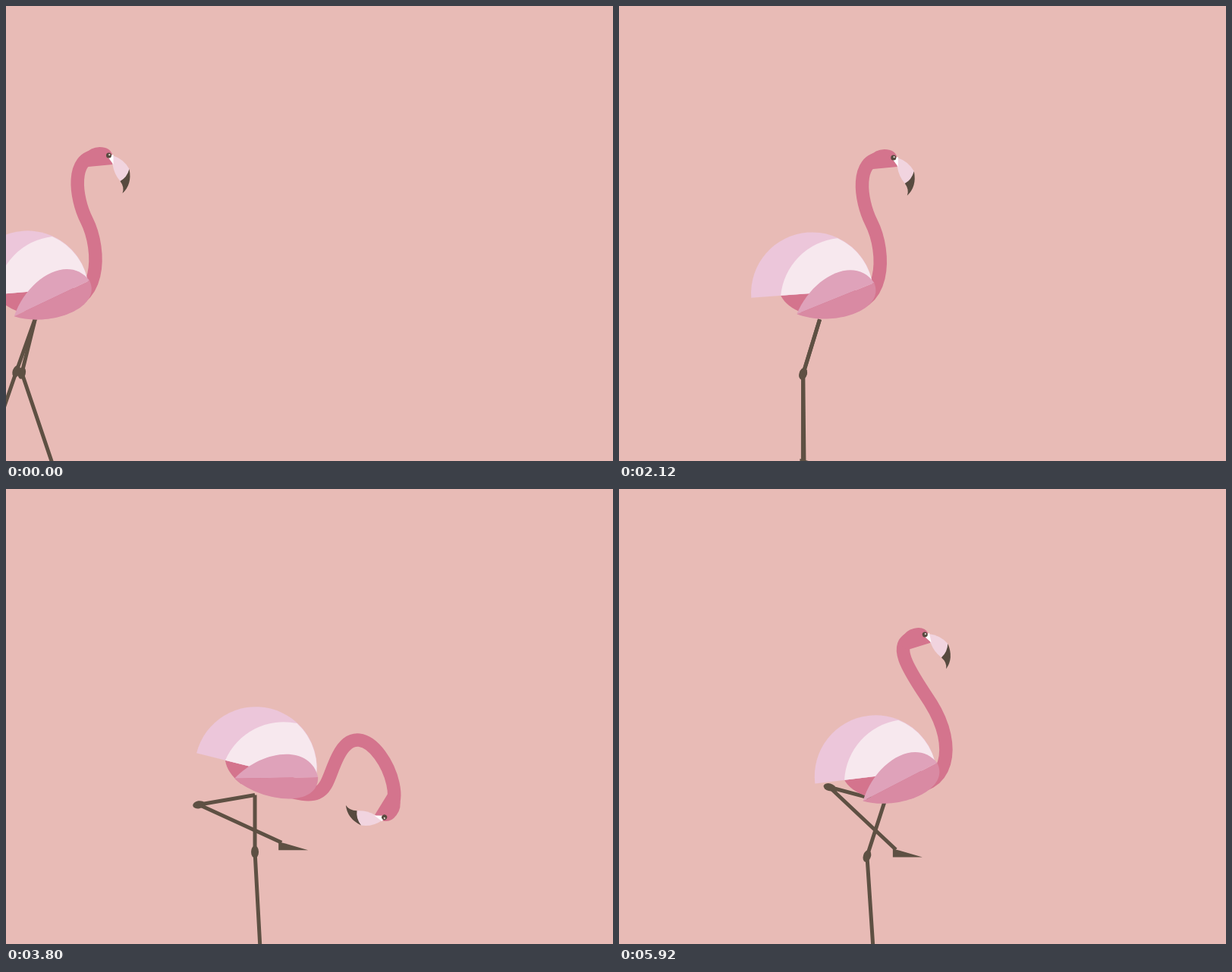
Write an HTML page with a canvas that moves like this. It is 800x600 px and loops after 6.8 s.

```html
<!DOCTYPE html>
<html lang="en">
<head>
<meta charset="utf-8">
<title>Flamingo</title>
<style>
  html, body { margin: 0; width: 100%; height: 100%; overflow: hidden; background: #e8bbb6; }
  canvas { display: block; }
</style>
</head>
<body>
<canvas id="stage" width="800" height="600"></canvas>
<script>
const ctx = document.getElementById('stage').getContext('2d');
const LOOP = 6800, TICK = 40, RAD = Math.PI / 180;
const STEP = 850, STRIDE = 1680, HALT = 2560, REST = 3240;
const GROUND = 606, THIGH = 75, SHIN = 120;
const COLOR = {
  sky: '#e8bbb6', tail: '#ecc6da', back: '#f7e8ee', body: '#d4748d', wingTop: '#dfa2ba',
  wingLow: '#d98aa3', leg: '#5e5043', beak: '#f1d4df', dark: '#574a3f'
};

const lerp = (a, b, k) => a + (b - a) * k;
const progress = (t, from, to) => Math.max(0, Math.min(1, (t - from) / (to - from)));
const smooth = u => u * u * (3 - 2 * u);
const backOut = u => 1 + 2.7 * (u - 1) ** 3 + 1.7 * (u - 1) ** 2;
const polar = ([x, y], r, deg) => [x + r * Math.cos(deg * RAD), y + r * Math.sin(deg * RAD)];
const offset = (origin, dx, dy, deg) => polar(polar(origin, dx, deg), dy, deg + 90);

// Positions are relative to the shoulder. The neck is two curves that meet at a joint,
// where "lean" is their direction and "back" and "ahead" are the handle lengths.
const stride = {
  dx: 0, y: 362, tilt: -4.8, wing: -25.5, thigh: 180,
  eyeX: 25.5, eyeY: -165, turn: 0, jointX: -4, jointY: -80, lean: -117, back: 45, ahead: 32
};
const nod = { ...stride, y: 371, tilt: -4.2, eyeX: 28, eyeY: -158, turn: 16.5 };
const settle = { ...stride, y: 368, tilt: -3.4, wing: -18.6 };
const tuck = {
  dx: 0, y: 381, tilt: 14, wing: -1, thigh: 181,
  eyeX: 55, eyeY: 0, turn: 166, jointX: 21, jointY: -47, lean: -72, back: 44, ahead: 50
};
const dip = {
  ...tuck, y: 380, thigh: 171,
  eyeX: 85, eyeY: 49, turn: 130, jointX: 26, jointY: -29, lean: -64, ahead: 72
};
const tall = {
  dx: 8, y: 361, tilt: -6.9, wing: -27.3, thigh: 195,
  eyeX: -16, eyeY: -169, turn: -12, jointX: -8, jointY: -78, lean: -122, back: 66, ahead: 36
};

// "swing" carries the head outwards on its way to the pose.
const moves = [
  { pose: nod, from: 0, to: 880 },
  { pose: stride, from: 880, to: STRIDE },
  { pose: settle, from: STRIDE, to: HALT },
  { pose: tuck, from: 2840, to: REST, swing: 40 },
  { pose: dip, from: REST, to: 4400, ease: backOut },
  { pose: tall, from: 4400, to: 5200, swing: 60 }
];

function poseAt(t) {
  let now = { ...stride };
  for (const { pose, from, to, ease = smooth, swing = 0 } of moves) {
    if (t <= from) break;
    const k = ease(progress(t, from, to)), next = {};
    for (const key in pose) next[key] = lerp(now[key], pose[key], k);
    next.eyeX += swing * Math.sin(Math.PI * k);
    now = next;
  }
  return now;
}

function walkedTo(t) {
  const w = Math.min(t, HALT), lag = w < STRIDE ? 15.5 : 3;
  const coast = 1 - (1 - progress(t, HALT, REST)) ** 2;
  return 110 + 0.1075 * w - lag * Math.sin(Math.PI * w / STRIDE) ** 2 + 29 * coast;
}

// Feet take turns: one stands while the other passes it by one step.
function footAt(t, leg) {
  const spot = n => 62 + 91 * n;
  const w = Math.min(t, 3 * STEP - 1), n = Math.floor(w / STEP), u = w / STEP - n;
  if ((n + leg) % 2 === 0) return [spot(n), GROUND];
  return [lerp(spot(n - 1), spot(n + 1), smooth(u)), GROUND - 8 * Math.sin(Math.PI * u)];
}

function fill(d, color) {
  ctx.fillStyle = color;
  ctx.fill(new Path2D(d));
}

function place([x, y], deg, draw) {
  ctx.save();
  ctx.translate(x, y);
  ctx.rotate(deg * RAD);
  draw();
  ctx.restore();
}

function drawLeg(t, leg, hip, pose) {
  let foot = footAt(t, leg);
  const stoop = (pose.tilt + 5) / 19, reach = 0.08 + 0.02 * (pose.y - 362);
  const kneeX = (reach * (foot[0] - hip[0]) - 20) * (1 - stoop);
  let angle = Math.acos(kneeX / THIGH) / RAD;
  const lift = leg === 0 ? smooth(progress(t, HALT, REST)) : 0;
  angle = lerp(angle, pose.thigh, lift);
  const knee = polar(hip, THIGH, angle);
  const folded = polar(knee, SHIN, 32 + 0.75 * (pose.thigh - 180));
  foot = foot.map((v, i) => lerp(v, folded[i], lift));

  ctx.strokeStyle = ctx.fillStyle = COLOR.leg;
  ctx.lineWidth = 5;
  ctx.lineJoin = 'round';
  ctx.beginPath();
  for (const point of [hip, knee, foot]) ctx.lineTo(...point);
  ctx.stroke();
  ctx.beginPath();
  ctx.ellipse(...knee, 8, 5, angle * RAD, 0, 7);
  ctx.fill();
  place(foot, 0, () => fill('M-4 -1 V10 H35 L4 1Z', COLOR.leg));
}

function drawNeck(shoulder, eye, pose) {
  const [x, y] = shoulder;
  const joint = [x + pose.jointX, y + pose.jointY];
  const nape = offset(eye, -15, 1, pose.turn);
  ctx.strokeStyle = COLOR.body;
  ctx.lineWidth = 17.5;
  ctx.lineCap = 'butt';
  ctx.beginPath();
  ctx.moveTo(...offset(shoulder, -50, 26, pose.tilt));
  ctx.bezierCurveTo(x + 16, y + 38, ...polar(joint, -pose.back, pose.lean), ...joint);
  ctx.bezierCurveTo(...polar(joint, pose.ahead, pose.lean), ...polar(nape, -36, pose.turn), ...nape);
  ctx.stroke();
}

function drawHead(open) {
  fill('M-27 15 Q-38 6 -32 -1 Q-24 -11 -12 -11 Q2 -11 5 0 L5 12Z', COLOR.body);
  fill('M5 0 Q20 5 27 18 L24 28 L15 34 Q7 25 5 12Z', COLOR.beak);
  fill('M27 18 Q31 38 18 50 Q21 42 15 34 Q24 29 27 18Z', COLOR.dark);
  fill('M-2 1 L6 -1 L6 12Z', '#fff');
  ctx.fillStyle = COLOR.dark;
  ctx.beginPath();
  ctx.ellipse(0, 0, 4.2 - 0.7 * open, 0.8 + 2.7 * open, 0, 0, 7);
  ctx.fill();
  if (open > 0.6) {
    ctx.fillStyle = '#e9dcd8';
    ctx.beginPath();
    ctx.arc(0.8, -0.8, 1.1, 0, 7);
    ctx.fill();
  }
}

function drawBody() {
  fill('M39 0 Q45 15 66 25 L110 27 L140 20 L161 0Z', COLOR.body);
  fill('M0 0 A80.5 80.5 0 0 1 161 0Z', COLOR.tail);
  fill('M39 0 A84 84 0 0 1 119 -70 A80.5 80.5 0 0 1 161 0 L161 6 L156 0Z', COLOR.back);
}

function drawWing() {
  fill('M-110 0 C-73 -38 -10 -44 0 0Z', COLOR.wingTop);
  fill('M-110 0 C-75 33 0 41 0 0Z', COLOR.wingLow);
}

function render(t) {
  ctx.fillStyle = COLOR.sky;
  ctx.fillRect(0, 0, 800, 600);

  const pose = poseAt(t);
  const shoulder = [walkedTo(t) + pose.dx, pose.y];
  const eye = [shoulder[0] + pose.eyeX, shoulder[1] + pose.eyeY];
  const hip = offset(shoulder, -75, 43, pose.tilt);
  const open = Math.min(1, Math.abs(t - 880) / 140, Math.abs(t - 5780) / 140);

  drawLeg(t, 0, hip, pose);
  drawLeg(t, 1, hip, pose);
  drawNeck(shoulder, eye, pose);
  place(offset(shoulder, -163, 8, pose.tilt), pose.tilt, drawBody);
  place(shoulder, pose.wing, drawWing);
  place(eye, pose.turn, () => drawHead(open));
}

const start = performance.now();
function tick() {
  const t = (performance.now() - start) % LOOP;
  render(Math.floor(t / TICK) * TICK);
  requestAnimationFrame(tick);
}
tick();
</script>
</body>
</html>
```
